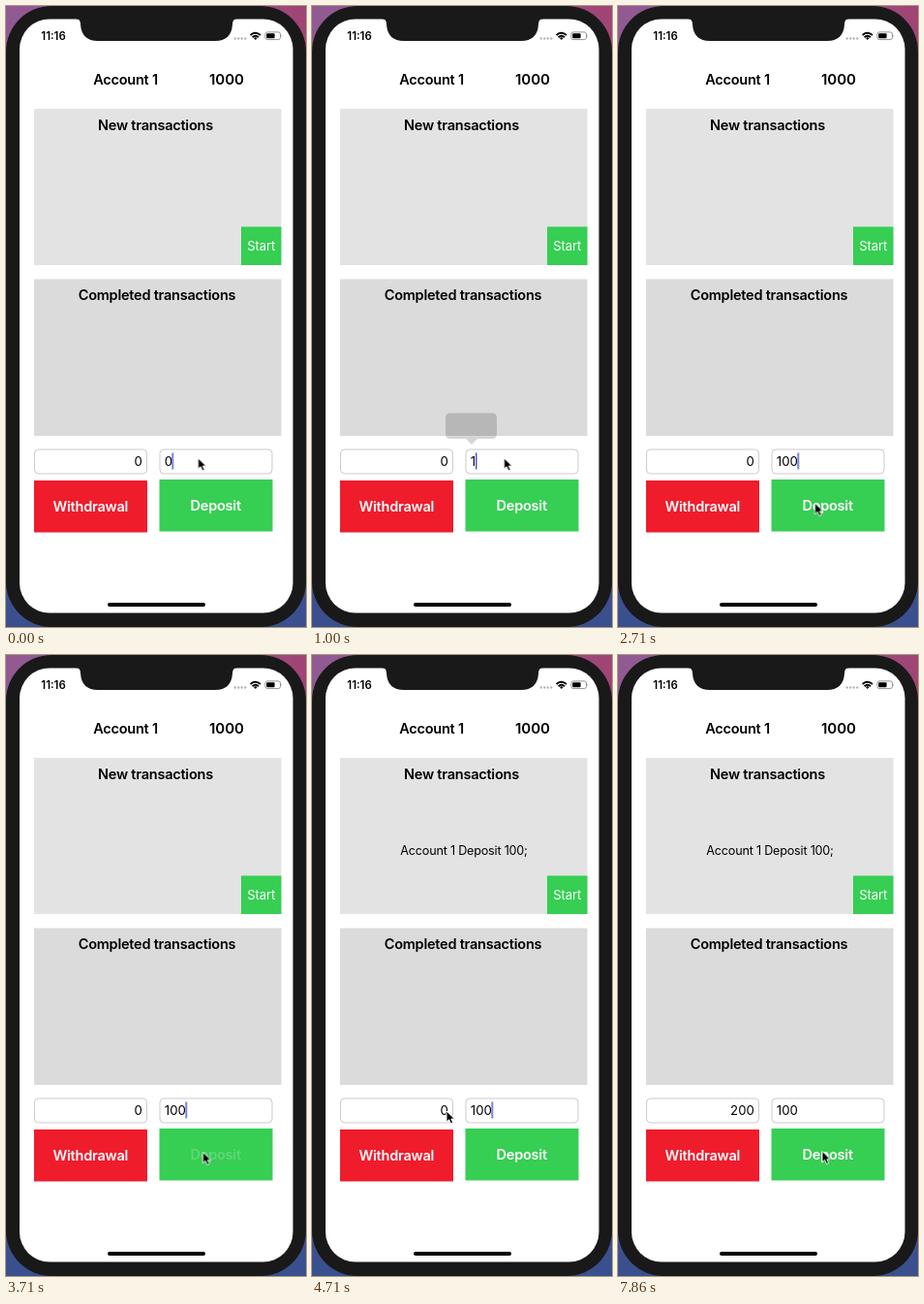
Write an HTML page that moves like this. It is 310 px wide and 640 px high and loops after 8000 ms.

```html
<!DOCTYPE html>
<html lang="en">
<head>
<meta charset="utf-8">
<title>Account transactions</title>
<style>
html, body { margin: 0; width: 100%; height: 100%; overflow: hidden; background: #191919; }
svg { display: block; width: 310px; height: 640px; font-family: Inter, "Liberation Sans", sans-serif; }
.h { font-size: 14.5px; font-weight: 600; letter-spacing: -.22px; text-anchor: middle; }
.num { font-size: 13.2px; }
.end { text-anchor: end; }
.box { fill: #fff; stroke: #cbcbcb; }
.caret { fill: #3f4fd0; }

.anim { animation: 8s step-end infinite; }
.d0 { animation-name: d0; }
.d1 { animation-name: d1; }
.d10 { animation-name: d10; }
.d100 { animation-name: d100; }
.w0 { animation-name: w0; }
.w2 { animation-name: w2; }
.w20 { animation-name: w20; }
.w200 { animation-name: w200; }
.bubble { animation-name: bubble; }
.press { animation-name: press; }
.entry { animation-name: entry; }
.caretD { animation-name: caretD; }
.caretW { animation-name: caretW; }
.pointer { animation-name: pointer; }

/* deposit amount */
@keyframes d0 { 0% { opacity: 1 } 5.375%, 100% { opacity: 0 } }
@keyframes d1 { 0% { opacity: 0 } 10.75% { opacity: 1 } 16.125%, 100% { opacity: 0 } }
@keyframes d10 { 0% { opacity: 0 } 16.125% { opacity: 1 } 19.625%, 100% { opacity: 0 } }
@keyframes d100 { 0% { opacity: 0 } 19.625%, 100% { opacity: 1 } }
@keyframes caretD {
  0% { transform: translateX(171.5px); opacity: 1 }
  5.375% { transform: translateX(163.5px); opacity: 1 }
  10.75% { transform: translateX(169px); opacity: 1 }
  16.125% { transform: translateX(177.5px); opacity: 1 }
  19.625% { transform: translateX(185.5px); opacity: 1 }
  62.5%, 100% { transform: translateX(185.5px); opacity: 0 }
}
@keyframes bubble {
  0% { opacity: 0 } 7.125% { opacity: .15 } 9% { opacity: .28 }
  12.5% { opacity: .16 } 14.25% { opacity: .06 } 16.125%, 100% { opacity: 0 }
}

/* button press and its result */
@keyframes press {
  0% { opacity: 1 } 41.125% { opacity: .2 } 48.25% { opacity: .35 }
  50% { opacity: .6 } 51.75% { opacity: .85 } 53.625%, 100% { opacity: 1 }
}
@keyframes entry { 0% { opacity: 0 } 48.25%, 100% { opacity: 1 } }

/* withdrawal amount */
@keyframes w0 { 0% { opacity: 1 } 67.875%, 100% { opacity: 0 } }
@keyframes w2 { 0% { opacity: 0 } 82.125% { opacity: 1 } 84%, 100% { opacity: 0 } }
@keyframes w20 { 0% { opacity: 0 } 84% { opacity: 1 } 85.75%, 100% { opacity: 0 } }
@keyframes w200 { 0% { opacity: 0 } 85.75%, 100% { opacity: 1 } }
@keyframes caretW {
  0% { opacity: 0 } 62.5% { opacity: 1 } 75% { opacity: .5 } 76.75% { opacity: 0 }
  80.375% { opacity: .3 } 82.125% { opacity: 1 } 91.125%, 100% { opacity: 0 }
}

@keyframes pointer {
  0% { transform: translate(198.5px, 466px) }
  26.75% { transform: translate(199px, 470px) }
  28.625% { transform: translate(200.5px, 485px) }
  30.375% { transform: translate(202.5px, 504px) }
  32.125% { transform: translate(203.5px, 512.5px) }
  55.375% { transform: translate(188px, 503px) }
  57.125% { transform: translate(153px, 481px) }
  58.875% { transform: translate(139px, 470px) }
  91.125% { transform: translate(144px, 473px) }
  92.875% { transform: translate(164px, 484px) }
  94.625% { transform: translate(189px, 499px) }
  96.5% { transform: translate(206px, 509px) }
  98.25%, 100% { transform: translate(211px, 511.5px) }
}
</style>
</head>
<body>
<svg viewBox="0 0 310 640">
  <defs>
    <linearGradient id="wall" x1="0" y1="0" x2="0" y2="1">
      <stop offset="0" stop-color="#935a92"/>
      <stop offset="1" stop-color="#394f8e"/>
    </linearGradient>
    <linearGradient id="glow" x1="0" y1="0" x2="1" y2="0">
      <stop offset=".5" stop-color="#a04474" stop-opacity="0"/>
      <stop offset="1" stop-color="#a04474"/>
    </linearGradient>
  </defs>

  <!-- phone -->
  <rect width="310" height="640" fill="url(#wall)"/>
  <rect width="310" height="60" fill="url(#glow)"/>
  <rect width="310" height="640" rx="47" fill="#191919"/>
  <rect x="14" y="13.5" width="282.5" height="612" rx="31" fill="#fff"/>
  <path d="M72 13q5 0 5 6q1 17 18 17H216q17 0 18-17q0-6 5-6z" fill="#191919"/>
  <rect x="105" y="615" width="101" height="4" rx="2"/>

  <!-- status bar -->
  <text x="49" y="35" text-anchor="middle" font-size="11.4" font-weight="600">11:16</text>
  <g fill="#b5b5b5">
    <circle cx="236.7" cy="33.5" r="1.2"/><circle cx="240.2" cy="33.5" r="1.2"/>
    <circle cx="243.7" cy="33.5" r="1.2"/><circle cx="247.2" cy="33.5" r="1.2"/>
  </g>
  <g fill="none" stroke="#000" stroke-width="1.8">
    <path d="M252.6 30q5.2-4.6 10.4 0M254.6 32.2q3.2-2.8 6.4 0"/>
  </g>
  <path d="M257.8 35l-1.9-1.9q1.9-1.5 3.8 0z"/>
  <rect x="267.9" y="26.9" width="15.6" height="7.7" rx="2.2" fill="none" stroke="#888" stroke-width=".9"/>
  <rect x="269.2" y="28.2" width="8.4" height="5.1" rx="1"/>
  <path d="M284.4 29.3q1.3 1.4 0 2.9z" fill="#888"/>

  <!-- account -->
  <text class="h" x="123.5" y="81">Account 1</text>
  <text class="h" x="228" y="81" style="font-size:15px;letter-spacing:0">1000</text>

  <!-- panels -->
  <rect x="29" y="106" width="255.5" height="161" fill="#e3e3e3"/>
  <text class="h" x="154.5" y="128">New transactions</text>
  <text class="anim entry" x="157" y="206.3" text-anchor="middle" font-size="12.6" letter-spacing="-.2">Account 1 Deposit 100;</text>
  <rect x="243" y="227.5" width="41.5" height="39.5" fill="#36ce53"/>
  <text x="263.7" y="252" text-anchor="middle" font-size="13" letter-spacing="-.1" fill="#fff">Start</text>
  <rect x="29" y="281.5" width="255.5" height="161.5" fill="#dbdbdb"/>
  <text class="h" x="156" y="303">Completed transactions</text>

  <!-- amounts -->
  <rect class="box" x="29.5" y="457" width="116" height="25" rx="4"/>
  <rect class="box" x="159" y="457" width="116" height="25" rx="4"/>
  <g class="num end">
    <text class="anim w0" x="140.8" y="474">0</text>
    <text class="anim w2" x="140.8" y="474">2</text>
    <text class="anim w20" x="140.8" y="474">20</text>
    <text class="anim w200" x="140.8" y="474">200</text>
  </g>
  <g class="num">
    <text class="anim d0" x="163.8" y="474">0</text>
    <text class="anim d1" x="163.8" y="474">1</text>
    <text class="anim d10" x="163.8" y="474">10</text>
    <text class="anim d100" x="163.8" y="474">100</text>
  </g>
  <rect class="caret anim caretW" x="139.3" y="460.5" width="1.4" height="17"/>
  <rect class="caret anim caretD" y="460.5" width="1.4" height="17"/>
  <path class="anim bubble" d="M143 419.5H186q5 0 5 5V441q0 5-5 5H171l-6 6-6-6H143q-5 0-5-5V424.5q0-5 5-5z"/>

  <!-- buttons -->
  <rect x="29" y="489" width="117" height="53.5" fill="#ef1c2c"/>
  <text class="h" x="87.3" y="521" fill="#fff">Withdrawal</text>
  <rect x="158.5" y="488" width="117" height="53.5" fill="#36ce53"/>
  <text class="h anim press" x="216.7" y="520.3" fill="#fff">Deposit</text>

  <path class="anim pointer" d="M0 0V11.2L2.6 8.8 4.5 13 6.6 12.1 4.8 8H8.3z" stroke="#fff" stroke-width=".9" stroke-linejoin="round"/>
</svg>
</body>
</html>
```
